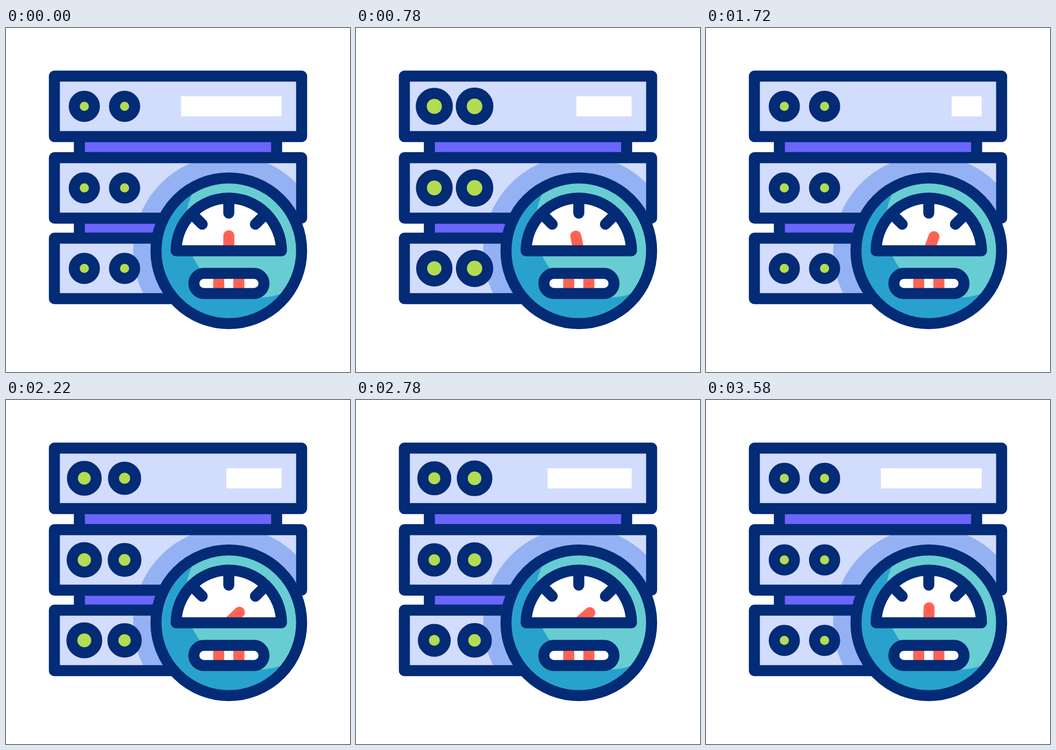
Recreate the animation shown at these times as an HTML page. Size 640 by 640 pixels, loop 3600 ms.

```html
<!DOCTYPE html>
<html lang="en">
<head>
<meta charset="utf-8">
<title>Server speed</title>
<style>
  html, body { margin: 0; width: 100%; height: 100%; overflow: hidden; background: #fff; }
  svg { display: block; width: 100vw; height: 100vh; }

  .line { stroke: #032b76; stroke-width: 20.5; stroke-linejoin: round; stroke-linecap: round; }
  .panel { fill: #d2dcfd; }
  .shade { fill: #94b2f3; }
  .white { fill: #fff; }
  .red { fill: #ff6252; }
  .none { fill: none; }

  .bar {
    transform-origin: 513px 146px;
    animation: bar 3.6s cubic-bezier(.33, .5, .6, 1) infinite;
  }
  @keyframes bar {
    50% { transform: scaleX(.296); }
  }

  .light {
    fill: #b2dc51;
    r: 18.75px;
    animation: pulse 1.8s cubic-bezier(.37, 0, .63, 1) infinite;
    animation-delay: calc(118ms - 1.8s + var(--col) * 90ms - var(--row) * 32ms);
  }
  @keyframes pulse {
    0%, 62.4%, 100% { r: 18.75px; }
    31.2% { r: 24.75px; }
  }

  .needle {
    stroke: #ff6252; stroke-width: 20.5; stroke-linecap: round;
    transform-origin: 414.5px 414px;
    animation: needle 3.6s infinite;
  }
  @keyframes needle {
    0% { transform: rotate(0deg); animation-timing-function: cubic-bezier(.37, 0, .63, 1); }
    14.4% { transform: rotate(-48deg); animation-timing-function: cubic-bezier(.37, 0, .63, 1); }
    31.9% { transform: rotate(50deg); animation-timing-function: cubic-bezier(.37, 0, .63, 1); }
    47.7%, 50% { transform: rotate(20.5deg); animation-timing-function: cubic-bezier(.61, 1, .88, 1); }
    50% { animation-timing-function: cubic-bezier(.39, .575, .565, 1); }
    69.4% { transform: rotate(52deg); animation-timing-function: cubic-bezier(.47, 0, .745, .715); }
    100% { transform: rotate(0deg); }
  }
</style>
</head>
<body>
<svg viewBox="0 0 640 640">
  <defs>
    <clipPath id="panels">
      <rect x="90" y="241.3" width="460" height="112.5"/>
      <rect x="90" y="391" width="400" height="112.5"/>
    </clipPath>
    <clipPath id="dial"><circle cx="414.5" cy="414.5" r="135.5"/></clipPath>
  </defs>

  <g fill="#6b65fb" class="line" stroke-linecap="butt">
    <rect x="136.5" y="202" width="367" height="39"/>
    <rect x="136.5" y="354" width="367" height="37"/>
  </g>

  <g class="panel">
    <rect x="90" y="89.5" width="460" height="112.5"/>
    <rect x="90" y="241.3" width="460" height="112.5"/>
    <rect x="90" y="391" width="330" height="112.5"/>
  </g>
  <circle class="shade" cx="414.5" cy="414.5" r="178" clip-path="url(#panels)"/>
  <g class="line none">
    <rect x="90" y="89.5" width="460" height="112.5"/>
    <rect x="90" y="241.3" width="460" height="112.5"/>
    <rect x="90" y="391" width="330" height="112.5"/>
  </g>

  <rect class="white bar" x="325.5" y="127" width="187.5" height="37.5"/>
  <g id="lights"></g>

  <g clip-path="url(#dial)">
    <circle cx="414.5" cy="414.5" r="135.5" fill="#28a2cd"/>
    <circle cx="469" cy="366" r="135.5" fill="#67cdd2"/>
  </g>
  <circle class="line none" cx="414.5" cy="414.5" r="135.5"/>

  <path class="white" d="M316.5 414.5a98 98 0 0 1 196 0z"/>
  <path class="needle" d="M414.5 414V386.5"/>
  <path class="line none" d="M316.5 414.5a98 98 0 0 1 196 0zM414.5 317V344.5M345 345L365 365M484 345L464 365"/>

  <rect class="white" x="349.5" y="456.5" width="130.5" height="37.5" rx="18.75"/>
  <g class="red">
    <rect x="385.5" y="460" width="20.5" height="30"/>
    <rect x="423" y="460" width="20.5" height="30"/>
  </g>
  <rect class="line none" x="349.5" y="456.5" width="130.5" height="37.5" rx="18.75"/>
</svg>
<script>
  const lights = document.getElementById('lights');
  [145.7, 297.5, 447.2].forEach((y, row) => {
    [145.7, 220.6].forEach((x, col) => {
      const c = document.createElementNS('http://www.w3.org/2000/svg', 'circle');
      c.setAttribute('class', 'line light');
      c.setAttribute('cx', x);
      c.setAttribute('cy', y);
      c.style.setProperty('--row', row);
      c.style.setProperty('--col', col);
      lights.append(c);
    });
  });
</script>
</body>
</html>
```
